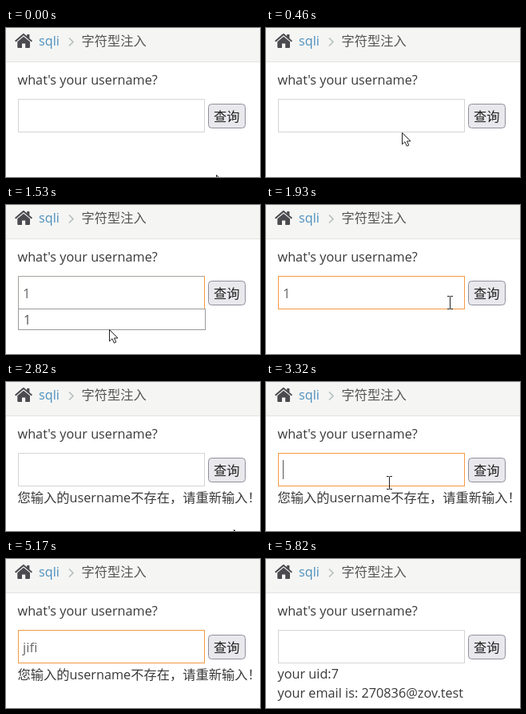
These frames come from a looping animation (318x187 px, 6220 ms). An HTML page:

```html
<!DOCTYPE html>
<html lang="zh-CN">
<head>
<meta charset="utf-8">
<title>字符型注入</title>
<style>
  html, body { margin: 0; width: 100%; height: 100%; overflow: hidden; background: #fff; }
  svg { display: block; width: 318px; height: 187px; }
  text { font: 16.25px "Open Sans", "Noto Sans CJK SC", "Noto Sans CJK", sans-serif; fill: #393939; white-space: pre; }
  .link { fill: #4c8fbd; }
  .crumb { fill: #555; }
  .dark { fill: #222; }
  #typed { font-size: 16.8px; fill: #696969; }
  .line { fill: none; stroke: #d5d5d5; }
  .hover { stroke: #b5b5b5; }
  .focus { stroke: #f59942; }
  .menu { fill: #fff; stroke: #999; }
  [data-on] { visibility: hidden; }
</style>
</head>
<body>
<svg viewBox="0 0 318 187">
  <rect width="318" height="42" fill="#f5f5f4"/>
  <rect y="42" width="318" height="1" fill="#e3e3e3"/>
  <g fill="#4a4a4f">
    <path d="M22 10.8 14.3 17.2V24q0 1 1 1H20V19.5h4.2V25H29q1 0 1-1V17.2Z"/>
    <path d="M22 6.8 26.2 10.3V8H29.4V13L33 16 31.8 17.4 22 9.3 12.3 17.4 11 16 20.8 7.6Q22 6.6 23.2 7.6Z"/>
  </g>
  <text class="link" x="41" y="22">sqli</text>
  <path d="M79 12.5 84 17.5 79 22.5" fill="none" stroke="#b2bfbd" stroke-width="1.6"/>
  <text class="crumb" x="94.5" y="22">字符型注入</text>
  <text x="14.5" y="71">what's your username?</text>

  <rect x="253.5" y="95.5" width="46" height="30" rx="4" fill="#e9e9ed" stroke="#8f8f9d"/>
  <text class="dark" x="260" y="117">查询</text>

  <text x="14.5" y="150.5" data-on="2040-5300">您输入的username不存在，请重新输入！</text>
  <g data-on="0-0 5300-6220">
    <text x="14.5" y="150">your uid:7</text>
    <text x="14.5" y="174">your email is: 270836@zov.test</text>
  </g>

  <rect class="line" x="15.5" y="89.5" width="233" height="41"/>
  <rect class="line hover" data-on="5300-5760" x="15.5" y="89.5" width="233" height="41"/>
  <rect class="line focus" data-on="600-2040 3230-5300" x="15.5" y="89.5" width="233" height="41"/>
  <text id="typed" x="21" y="116.5"></text>
  <rect id="caret" data-on="600-1530 3230-3760 4230-4840" y="98" width="1" height="24" fill="#555"/>

  <g data-on="1190-1730">
    <path class="line" style="stroke:#a5a29d" d="M15.5 130V89.5H248"/>
    <rect class="menu" x="15.5" y="130.5" width="234" height="26"/>
    <rect data-on="1460-1530" x="16" y="131" width="233" height="25" fill="#f0f0f0"/>
    <text class="crumb" x="22" y="149.5">1</text>
  </g>
  <g data-on="4295-4360">
    <rect class="menu" x="15.5" y="130.5" width="234" height="26"/>
    <text class="crumb" x="22" y="149.5">jifi</text>
  </g>

  <g id="mouse" data-on="0-3960 4560-5170 5760-5820">
    <path id="arrow" d="M.5.5V15L4 11.8 6.3 17.2 8.8 16.1 6.5 11H11Z" fill="#fff" stroke="#222"/>
    <path id="beam" d="M-3.5-8H-1Q0-8 0-7V7Q0 8-1 8H-3.5M3.5-8H1Q0-8 0-7M0 7Q0 8 1 8H3.5" transform="translate(.5 .5)" fill="none" stroke="#222"/>
  </g>
</svg>
<script>
  const LOOP = 6220, FRAME = 65;
  const $ = id => document.getElementById(id);
  const typed = $("typed"), caret = $("caret"), mouse = $("mouse"), arrow = $("arrow"), beam = $("beam");

  const timed = [...document.querySelectorAll("[data-on]")].map(el => ({
    el, spans: el.dataset.on.split(" ").map(s => s.split("-").map(Number))
  }));

  // time, field value
  const values = [[0, ""], [1060, "1"], [2040, ""], [4230, "j"], [4295, "ji"],
                  [4510, "jif"], [4560, "jifi"], [5300, ""]];

  // time, x, y of the pointer
  const path = [[0, 263, 184], [70, 263, 184], [580, 140, 114], [720, 141, 116],
                [1040, 132, 152], [1460, 132, 152], [1495, 129, 156], [1730, 129, 156],
                [1950, 272, 108], [2060, 272, 108], [2270, 285, 185], [2820, 285, 185],
                [3230, 160, 122], [3380, 150, 129], [5400, 150, 129], [5700, 148, 145], [LOOP, 148, 145]];

  function pointAt(t) {
    const i = path.findIndex(p => p[0] > t);
    const [t0, x0, y0] = path[i - 1], [t1, x1, y1] = path[i];
    const k = (t - t0) / (t1 - t0);
    return [Math.round(x0 + (x1 - x0) * k), Math.round(y0 + (y1 - y0) * k)];
  }

  function draw(t) {
    for (const { el, spans } of timed) {
      const on = spans.some(([a, b]) => t >= a && t < b);
      el.style.visibility = on ? "inherit" : "hidden";
    }
    const value = values.filter(v => v[0] <= t).pop()[1];
    if (typed.textContent !== value) typed.textContent = value;
    caret.setAttribute("x", Math.floor(21 + (value ? typed.getComputedTextLength() : 0)));

    const [x, y] = pointAt(t - t % FRAME);
    const inField = x > 15 && x < 249 && y > 89 && y < 131;
    mouse.setAttribute("transform", `translate(${x} ${y})`);
    arrow.style.display = inField ? "none" : "";
    beam.style.display = inField ? "" : "none";
  }

  const start = performance.now();
  function tick() {
    draw((performance.now() - start) % LOOP);
    requestAnimationFrame(tick);
  }
  tick();
</script>
</body>
</html>
```
